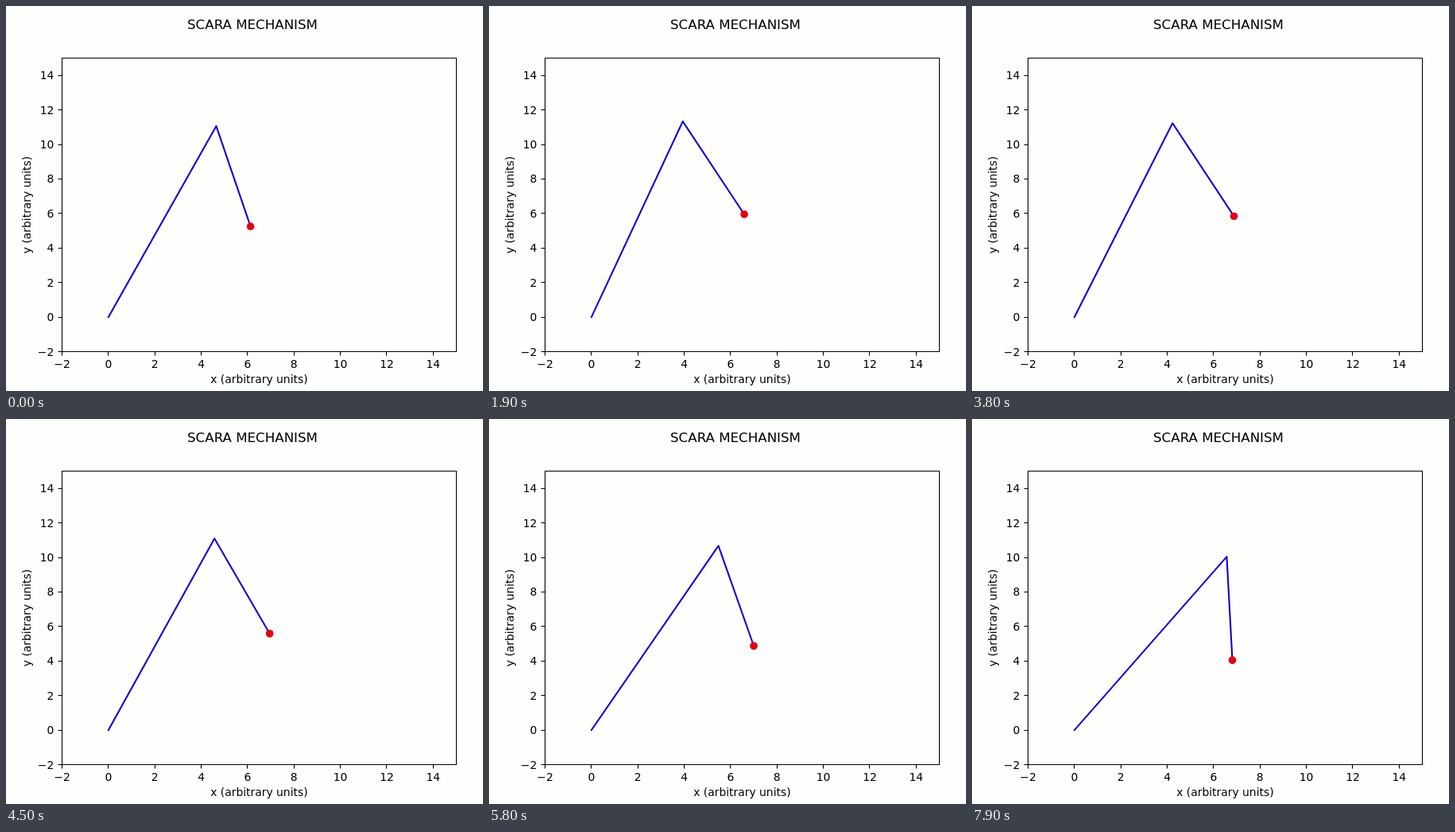
These frames come from a looping animation (600 by 484 pixels, 8 s). An HTML page with a canvas:

```html
<!DOCTYPE html>
<html lang="en">
<head>
<meta charset="utf-8">
<title>SCARA mechanism</title>
<style>
  html, body { margin: 0; width: 100%; height: 100%; overflow: hidden; background: #fefffc; }
  canvas { display: block; }
</style>
</head>
<body>
<canvas id="stage" width="600" height="484"></canvas>
<script>
const ctx = document.getElementById('stage').getContext('2d');

const LOOP = 8000, FRAME = 100, STEP = 240;
const BOX = { left: 70.5, right: 566.5, top: 65.5, bottom: 434.5 };
const MIN = -2, MAX = 15;
const UPPER = 12, FORE = 6;
const INK = '#000', BLUE = '#1600cd', RED = '#e60012';

const px = x => BOX.left + (x - MIN) * (BOX.right - BOX.left) / (MAX - MIN);
const py = y => BOX.bottom - (y - MIN) * (BOX.bottom - BOX.top) / (MAX - MIN);

function text(str, x, y, align, size = 13.89) {
  ctx.font = `${size}px "DejaVu Sans", sans-serif`;
  ctx.textAlign = align;
  ctx.fillText(str, x, y);
}

function line(points, color, width) {
  ctx.beginPath();
  points.forEach(([x, y]) => ctx.lineTo(x, y));
  ctx.strokeStyle = color;
  ctx.lineWidth = width;
  ctx.stroke();
}

function drawAxes() {
  ctx.fillStyle = INK;
  ctx.lineCap = 'butt';
  for (let v = MIN; v < MAX; v += 2) {
    const label = String(v).replace('-', '\u2212');
    const x = Math.floor(px(v)) + 0.5, y = Math.floor(py(v)) + 0.5;
    line([[x, BOX.bottom], [x, BOX.bottom + 5]], INK, 1.1);
    line([[BOX.left, y], [BOX.left - 5, y]], INK, 1.1);
    text(label, px(v), 455, 'center');
    text(label, 60.3, py(v) + 5, 'right');
  }
  ctx.strokeStyle = INK;
  ctx.lineWidth = 1.1;
  ctx.strokeRect(BOX.left, BOX.top, BOX.right - BOX.left, BOX.bottom - BOX.top);

  text('SCARA MECHANISM', 310, 29, 'center', 16.67);
  text('x (arbitrary units)', 318.4, 474, 'center');
  ctx.save();
  ctx.translate(31, 250);
  ctx.rotate(-Math.PI / 2);
  text('y (arbitrary units)', 0, 0, 'center');
  ctx.restore();
}

// The tip follows a figure eight in steps of a hundredth of a turn.
function tipAt(t) {
  const shown = Math.floor(t / FRAME) * FRAME;
  const s = 2 * Math.PI * (2 + Math.floor((shown + 25) / STEP)) / 100;
  return [6 + Math.sin(s), 5 + Math.sin(2 * s)];
}

function elbowFor([x, y]) {
  const d = Math.hypot(x, y);
  const angle = Math.atan2(y, x) +
    Math.acos((d * d + UPPER * UPPER - FORE * FORE) / (2 * UPPER * d));
  return [UPPER * Math.cos(angle), UPPER * Math.sin(angle)];
}

function drawArm(t) {
  const tip = tipAt(t);
  const joints = [[0, 0], elbowFor(tip), tip].map(([x, y]) => [px(x), py(y)]);
  ctx.lineCap = 'square';
  ctx.lineJoin = 'round';
  line(joints, BLUE, 2.08);
  ctx.beginPath();
  ctx.arc(...joints[2], 4.85, 0, 2 * Math.PI);
  ctx.fillStyle = RED;
  ctx.fill();
}

function render() {
  ctx.fillStyle = '#fefffc';
  ctx.fillRect(0, 0, 600, 484);
  drawAxes();
  drawArm(performance.now() % LOOP);
  requestAnimationFrame(render);
}
render();
</script>
</body>
</html>
```
